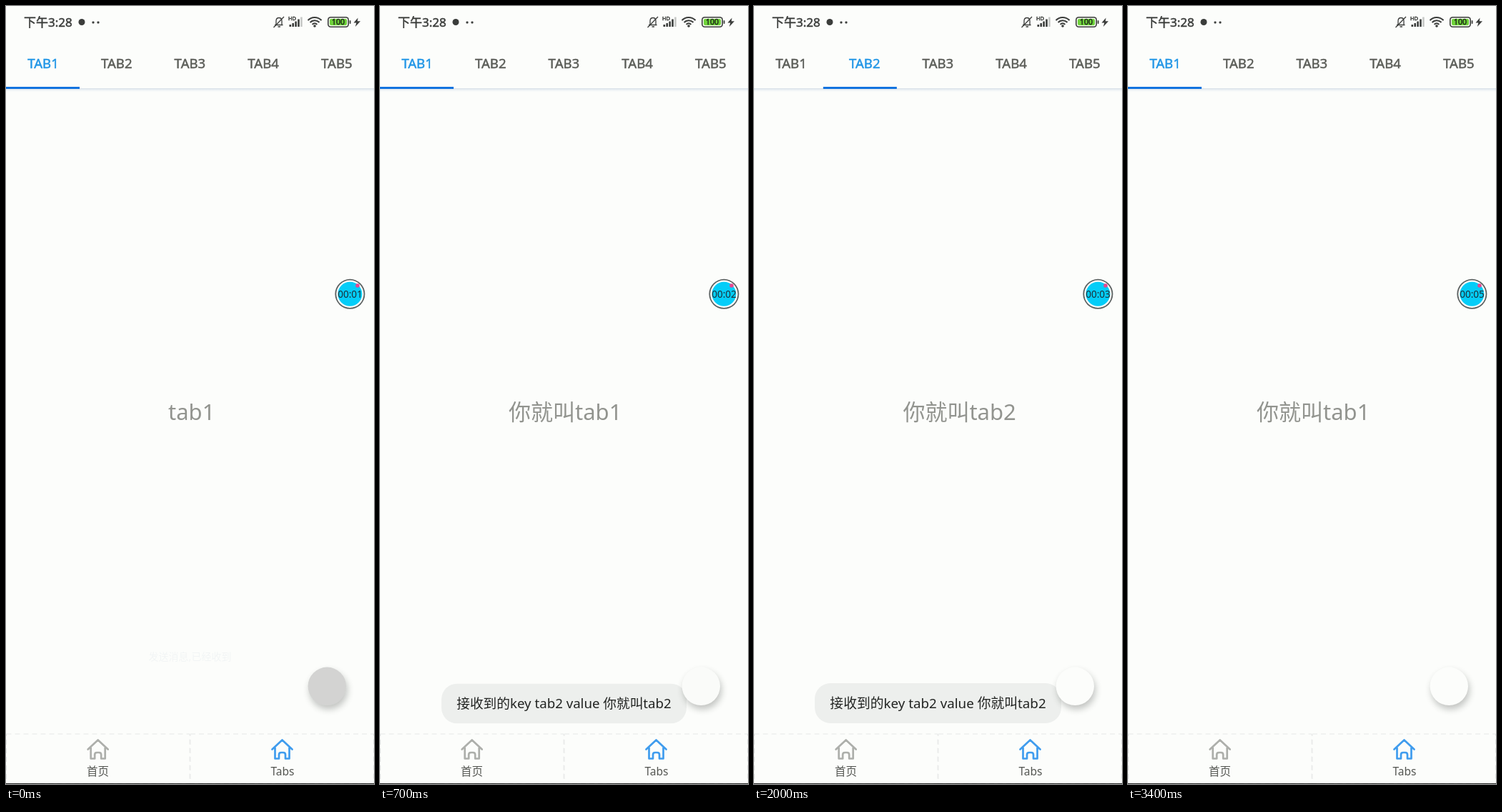
Animation of 515x1088 px, one loop 3.5 s. Source, as an HTML page with a canvas:

```html
<!DOCTYPE html>
<html lang="zh">
<head>
<meta charset="utf-8">
<style>
  html, body { margin: 0; width: 100%; height: 100%; overflow: hidden; background: #fcfdfb; }
  canvas { display: block; }
</style>
</head>
<body>
<canvas id="stage"></canvas>
<script>
const W = 515, H = 1088, LOOP = 3500, STEP = 100, TAB_W = W / 5;
const FONT = '"Noto Sans", "Noto Sans CJK SC", sans-serif';
const BG = '#fcfdfb', INK = '#3b3d3b', GRAY = '#adafab', BLUE = '#3f9cee';

const canvas = document.getElementById('stage');
const ctx = canvas.getContext('2d');
const ratio = window.devicePixelRatio || 1;
canvas.width = W * ratio;
canvas.height = H * ratio;
canvas.style.width = W + 'px';
canvas.style.height = H + 'px';

function text(str, x, y, size, color, { align = 'left', bold = 0 } = {}) {
  ctx.font = `400 ${size}px ${FONT}`;
  ctx.textAlign = align;
  ctx.fillStyle = color;
  ctx.fillText(str, x, y);
  if (bold) {
    ctx.strokeStyle = color;
    ctx.lineWidth = bold;
    ctx.strokeText(str, x, y);
  }
}

function rect(x, y, w, h, color) {
  ctx.fillStyle = color;
  ctx.fillRect(x, y, w, h);
}

function roundRect(x, y, w, h, r, color) {
  ctx.fillStyle = color;
  ctx.beginPath();
  ctx.roundRect(x, y, w, h, r);
  ctx.fill();
}

function disc(x, y, r, color) {
  ctx.fillStyle = color;
  ctx.beginPath();
  ctx.arc(x, y, r, 0, Math.PI * 2);
  ctx.fill();
}

function line(d, color, width) {
  ctx.strokeStyle = color;
  ctx.lineWidth = width;
  ctx.stroke(new Path2D(d));
}

// Linear interpolation through [time, value] pairs
function track(keys, t) {
  if (t <= keys[0][0]) return keys[0][1];
  for (let i = 1; i < keys.length; i++) {
    const [t0, a] = keys[i - 1], [t1, b] = keys[i];
    if (t <= t1) return a + (b - a) * (t - t0) / (t1 - t0);
  }
  return keys[keys.length - 1][1];
}

const PAGE = [
  [1700, 0], [1800, 0.346], [1900, 0.74], [2000, 0.94], [2100, 0.99], [2200, 1],
  [2900, 1], [3000, 0.802], [3100, 0.4], [3200, 0.13], [3300, 0.02], [3400, 0]
];
const TOAST_ALPHA = [[100, 0], [200, 0.45], [300, 0.95], [400, 1], [2000, 1], [2100, 0.5], [2200, 0.09], [2300, 0]];
const TOAST_EXIT = [[2000, 0], [2200, 0.09]];

function statusBar() {
  text('下午3:28', 25, 29, 17, INK, { bold: 0.5 });
  disc(106, 22.5, 4.5, INK);
  roundRect(120.5, 21.5, 3, 3, 1, INK);
  roundRect(127.5, 21.5, 3, 3, 1, INK);

  // Muted bell
  line('M376 26.5 H387.5 M378 26 V21 Q378 16.5 382 16.5 Q386 16.5 386 21 V26 M380.5 29 H384', INK, 1.3);
  line('M389 15 L374.5 30', INK, 1.3);

  text('HD', 395, 20, 7.5, INK, { bold: 0.5 });
  for (let i = 0; i < 5; i++) {
    const h = [3, 5, 7.5, 10.5, 13.5][i];
    rect(396.5 + i * 3.9, 29 - h, 2.6, h, i < 4 ? INK : '#c6c8c6');
  }

  // Wireless arcs
  ctx.strokeStyle = INK;
  ctx.lineWidth = 2.1;
  for (const r of [4.6, 8.8, 13]) {
    ctx.beginPath();
    ctx.arc(432, 29, r, -Math.PI * 0.76, -Math.PI * 0.24);
    ctx.stroke();
  }
  disc(432, 28, 1.8, INK);

  // Battery
  roundRect(450, 15, 30, 15, 4.5, INK);
  roundRect(451.6, 16.6, 26.8, 11.8, 3, '#f4f8ef');
  roundRect(453, 18, 24, 9, 2, '#6ed23a');
  roundRect(480.7, 20, 1.8, 5, 1, INK);
  text('100', 465, 26.4, 10.5, '#20301a', { align: 'center', bold: 0.5 });
  ctx.fillStyle = INK;
  ctx.fill(new Path2D('M492.5 16.5 L486.5 23.5 H490.3 L488.8 29 L496 21.3 H491.8 Z'));
}

function tabBar(page) {
  const active = Math.round(page);
  for (let i = 0; i < 5; i++) {
    text('TAB' + (i + 1), 30.2 + i * 102.7, 86.5, 18.6,
      i === active ? '#2196e6' : '#5b5d58', { bold: 0.5 });
  }
  const shade = ctx.createLinearGradient(0, 115, 0, 120);
  shade.addColorStop(0, '#d6dfe7');
  shade.addColorStop(0.4, '#eaf0f4');
  shade.addColorStop(1, BG);
  rect(0, 115, W, 5, shade);
  rect(page * TAB_W, 113, TAB_W, 3, '#1273df');
}

function house(x, color) {
  ctx.save();
  ctx.translate(x, 1025);
  ctx.lineCap = ctx.lineJoin = 'round';
  line('M-14 14.5 L0 1.5 L14 14.5 M-10 12 V27.5 H-4.5 V22 Q-4.5 19 -1.5 19 H1.5 Q4.5 19 4.5 22 V27.5 H10 V12', color, 2.7);
  ctx.restore();
}

function bottomNav() {
  ctx.setLineDash([7, 5]);
  ctx.strokeStyle = '#e6e8e7';
  ctx.lineWidth = 1;
  for (const x of [0, W / 2]) ctx.strokeRect(x + 0.5, 1018, W / 2 - 1, 69);
  ctx.setLineDash([]);
  house(128.7, GRAY);
  house(386.5, BLUE);
  text('首页', 128.5, 1076, 15.5, '#555753', { align: 'center' });
  text('Tabs', 387, 1076, 15.5, '#555753', { align: 'center' });
  rect(0, 1087, W, 1, '#2a2b2a');
}

function pages(t, page) {
  const shift = -page * W, color = '#92948f';
  if (t < 100) text('tab1', 227 + shift, 579, 31, color);
  else text('你就叫tab1', 180 + shift, 579, 31, color);
  text('你就叫tab2', 177.5 + W + shift, 579, 31, color);
}

function toast(t) {
  if (t < 100) text('发送消息,已经收到', 257.5, 915, 14, '#f2f5f5', { align: 'center' });
  const alpha = track(TOAST_ALPHA, t);
  if (!alpha) return;
  const scale = 1 - 0.163 * Math.exp((300 - t) / 121) - track(TOAST_EXIT, t);
  ctx.save();
  ctx.globalAlpha = alpha;
  ctx.translate(257.5, 975 + (t > 2000 ? 55 : 80) * (1 - scale));
  ctx.scale(scale, scale);
  roundRect(-172.5, -28, 345, 56, 22, t < 500 ? '#e9ebec' : '#edefed');
  text('接收到的key tab2 value 你就叫tab2', 0, 7, 18.8, '#222422', { align: 'center' });
  ctx.restore();
}

function roundButton(t) {
  ctx.save();
  ctx.shadowColor = 'rgba(40,45,40,0.28)';
  ctx.shadowBlur = 10 * ratio;
  ctx.shadowOffsetX = 2 * ratio;
  ctx.shadowOffsetY = 5.5 * ratio;
  disc(449.3, 951.3, 26.7, '#fcfdfb');
  ctx.restore();
  disc(449.3, 951.3, 26.7, `rgba(0,0,0,${0.165 * Math.exp(-t / 212)})`);
}

function recorder(t) {
  const sec = 1 + [300, 1300, 2400, 3400].filter(s => t >= s).length;
  disc(481.4, 402.8, 21, '#5c6160');
  disc(481.4, 402.8, 19.2, '#fdfefe');
  disc(481.4, 402.8, 17, '#04cdf8');
  disc(492, 391, 2.8, '#e4488f');
  text('00:0' + sec, 481.5, 408, 13.6, '#1d3038', { align: 'center' });
}

function draw(t) {
  ctx.setTransform(ratio, 0, 0, ratio, 0, 0);
  rect(0, 0, W, H, BG);
  const page = track(PAGE, t);
  pages(t, page);
  statusBar();
  tabBar(page);
  bottomNav();
  toast(t);
  roundButton(t);
  recorder(t);
}

const start = performance.now();
function tick() {
  const t = (performance.now() - start) % LOOP;
  draw(Math.floor(t / STEP) * STEP);
  requestAnimationFrame(tick);
}
tick();
</script>
</body>
</html>
```
